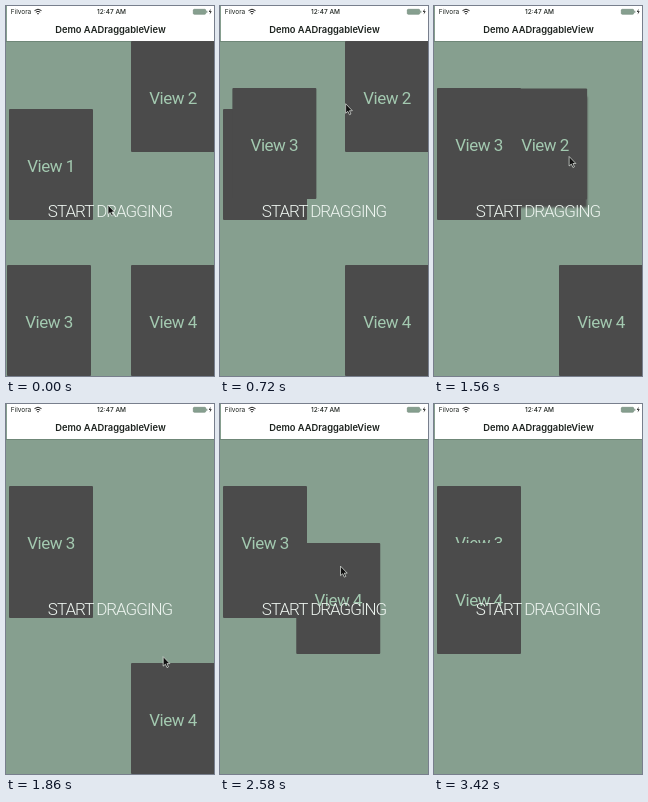
Animation of 208x370 px, one loop 3.6 s. Source, as an HTML page:

```html
<!DOCTYPE html>
<html lang="en">
<head>
<meta charset="utf-8">
<title>Demo AADraggableView</title>
<style>
  html, body { margin: 0; height: 100%; overflow: hidden; background: #869f8f; }
  svg { display: block; width: 100vw; height: 100vh; }
  text { font-family: Inter, sans-serif; text-anchor: middle; fill: #1c221e; }
  .status { font-size: 6.5px; }
  .title { font-size: 9.3px; font-weight: 600; }
  .view text, .hint { font: 17px Roboto, sans-serif; }
  .view rect { fill: #4b4b4b; }
  .view text { fill: #a3c9b0; letter-spacing: -.5px; }
  .dragging rect { filter: drop-shadow(0 8px .8px #4b4b4b); }
  .hint { font-weight: 300; fill: #eef5f0; letter-spacing: -1px; }
</style>
</head>
<body>
<svg viewBox="0 0 208 370">
  <rect width="208" height="370" fill="#869f8f"/>
  <rect x="1" width="207" height="35" fill="#fff"/>
  <path d="M0 35.5H208" stroke="#6f8778"/>
  <text class="status" x="15" y="8">Filvora</text>
  <g fill="none" stroke="#222">
    <path d="M28.5 4.6Q32 1.8 35.5 4.6M29.8 6.2Q32 4.4 34.2 6.2"/>
    <path d="M31.3 7.6H32.7" stroke-width="1.4"/>
  </g>
  <text class="status" x="105.5" y="8" font-weight="500">12:47 AM</text>
  <rect x="187.3" y="3.3" width="12.4" height="5" rx="1" fill="#869f8f" stroke="#6c8576" stroke-width=".6"/>
  <path d="M200.8 4.8V6.8" stroke="#6c8576"/>
  <path d="M204.6 2.8L202.8 6H204.2L203.6 8.6L205.8 5.2H204.3Z" fill="#222"/>
  <text class="title" x="104.5" y="27">Demo AADraggableView</text>
  <g id="views"></g>
  <text class="hint" x="104" y="210.5">START DRAGGING</text>
  <path id="cursor" d="M0 0V9.5L2.2 7.6L3.8 11L5.3 10.3L3.8 7H6.7Z" fill="#111" stroke="#e8eee9" stroke-width=".7"/>
</svg>
<script>
const LOOP = 3600, STEP = 60, LAST = 3420, SNAP = 240, MARGIN = 3;
const ENTER = { x: 102, y: 199 }, EXIT = { x: 200, y: 380 }, EXIT_TIME = 3300;

// hold: pointer offset inside the view, by: drag distance, bend: sideways lag
const views = [
  { x: 3, y: 103 },
  { x: 125, y: 35, grab: 1140, drop: 1577, hold: [66, 68], by: [-60, 51], bend: 1.8 },
  { x: 1, y: 259, grab: 300, drop: 660, hold: [54, 11], by: [12, -177], bend: .8 },
  { x: 125, y: 259, grab: 1990, drop: 2530, hold: [36, 8], by: [-46, -120], bend: 5 }
];
const drags = views.filter(v => v.grab).sort((a, b) => a.grab - b.grab);

const progress = (t, from, to) => Math.min(1, Math.max(0, (t - from) / (to - from)));
const mix = (a, b, p) => a + (b - a) * p;
const mixPoint = (a, b, p) => ({ x: mix(a.x, b.x, p), y: mix(a.y, b.y, p) });
const easeInOut = p => p < .5 ? 4 * p ** 3 : 1 - 4 * (1 - p) ** 3;
const place = (el, { x, y }) => el.setAttribute('transform', `translate(${x} ${y})`);

function dragged(v, t) {
  if (!v.grab) return v;
  const p = progress(t, v.grab, v.drop);
  return { x: v.x + v.by[0] * p ** v.bend, y: v.y + v.by[1] * p ** 1.8 };
}

function position(v, t) {
  const { x, y } = dragged(v, t);
  const snap = v.grab ? easeInOut(progress(t, v.drop, v.drop + SNAP)) : 0;
  return { x: mix(x, MARGIN, snap), y };
}

function held(v, t) {
  const { x, y } = dragged(v, t);
  return { x: x + v.hold[0], y: y + v.hold[1] };
}

// The pointer darts to the next view, carries it, and finally drifts off stage
function pointer(t) {
  let from = ENTER, since = 0;
  for (const v of drags) {
    if (t < v.grab) return mixPoint(from, held(v, t), progress(t, since, v.grab) ** .36);
    if (t < v.drop) return held(v, t);
    from = held(v, t);
    since = v.drop;
  }
  return mixPoint(from, EXIT, progress(t, since, EXIT_TIME));
}

const layer = document.getElementById('views');
const cursor = document.getElementById('cursor');

layer.innerHTML = views.map((_, i) =>
  `<g class="view"><rect width="84" height="111" rx="1"/><text x="42" y="63">View ${i + 1}</text></g>`
).join('');

function draw(now) {
  const t = Math.min(LAST, Math.floor(now % LOOP / STEP) * STEP);
  views.forEach((view, i) => {
    const el = layer.children[i];
    place(el, position(view, t));
    el.classList.toggle('dragging', t >= view.grab && t < view.drop);
  });
  place(cursor, pointer(t));
}

let start;
function tick(now) {
  start ??= now;
  draw(now - start);
  requestAnimationFrame(tick);
}
draw(0);
requestAnimationFrame(tick);
</script>
</body>
</html>
```
